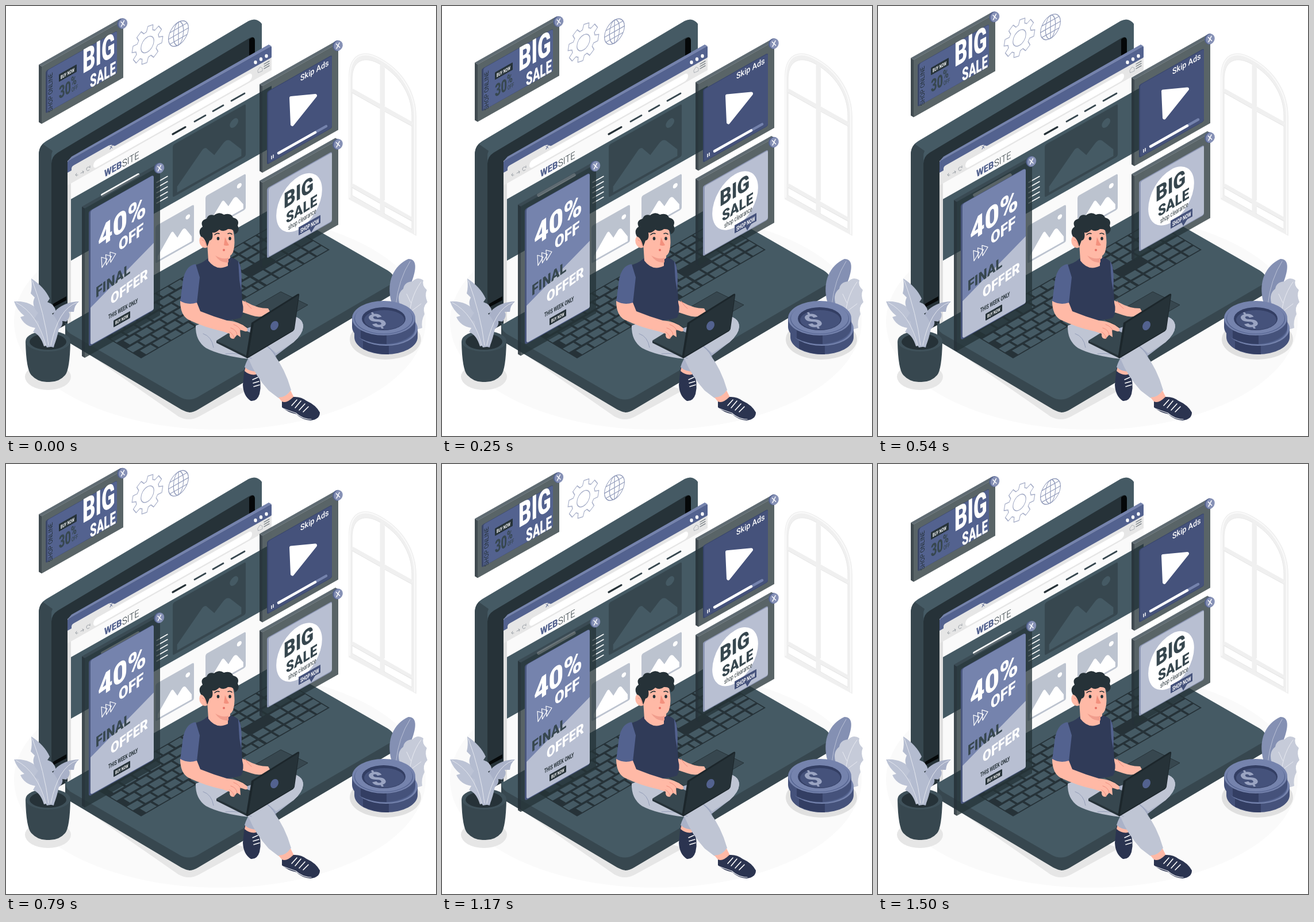
These frames come from a looping animation (748x748 px, 1.54 s). An HTML page with a canvas:

```html
<!DOCTYPE html>
<html lang="en">
<head>
<meta charset="utf-8">
<title>Pop-up ads</title>
<style>
  html, body { margin: 0; width: 100%; height: 100%; overflow: hidden; background: #fff; }
  canvas { position: absolute; left: 0; top: 0; }
</style>
</head>
<body>
<canvas id="back" width="748" height="748"></canvas>
<canvas id="front" width="748" height="748"></canvas>
<script>
const LOOP = 1540, RISE = 14.5;
const SLOPE = 0.565, STEEP = 0.72, ISO = 0.866, CONDENSED = 0.6;
const INK = '#263238', SLATE = '#37474f', STEEL = '#455a64';
const NAVY = '#45527b', DEEP = '#333e63', BLUE = '#53628f', SOFT = '#7583ad', PALE = '#b8bfd2', SKIN = '#ffb9a6';
const back = document.getElementById('back').getContext('2d');
const front = document.getElementById('front').getContext('2d');
let g = back;

function fill(color, d) {
  g.fillStyle = color;
  g.fill(new Path2D(d), 'evenodd');
}
function line(color, width, d) {
  g.strokeStyle = color;
  g.lineWidth = width;
  g.lineCap = g.lineJoin = 'round';
  g.stroke(new Path2D(d));
}
function oval(color, x, y, rx, ry, angle = 0) {
  g.fillStyle = color;
  g.beginPath();
  g.ellipse(x, y, rx, ry, angle, 0, 7);
  g.fill();
}
// Runs draw in a plane that rises to the right; sx is the horizontal scale.
function plane(x, y, draw, sx = 1, slope = SLOPE) {
  g.save();
  g.transform(sx, -slope * sx, 0, 1, x, y);
  draw();
  g.restore();
}
function slab(color, x, y, w, h, r = 0) {
  plane(x, y, () => {
    g.fillStyle = color;
    g.beginPath();
    g.roundRect(0, 0, w, h, r);
    g.fill();
  });
}
function text(str, x, y, size, color, weight = 700, sx = CONDENSED, slope = SLOPE) {
  plane(x, y, () => {
    g.font = `${weight} ${size}px Roboto, sans-serif`;
    g.fillStyle = color;
    g.fillText(str, 0, 0);
  }, sx, slope);
}
function bar(color, width, x, y, length) {
  line(color, width, `M${x},${y}l${length},${-length * SLOPE}`);
}

function archWindow() {
  const outer = 'M596,336V124C596,82 622,73 652,91C690,112 714,150 714,192V400Z';
  const inner = 'M602,329V126C603,92 625,87 650,101C685,121 706,155 706,191V388Z';
  fill('#f0f0f0', outer + inner);
  line('#e8e8e8', 1, inner);
  line('#f0f0f0', 7, 'M654,104V360M604,148L704,204M604,313L704,370');
  line('#e4e4e4', 1, 'M658,108V174M658,184V338M658,349V361M602,151L650,178M658,183L706,209M602,316L650,343M658,348L706,374');
  line('#fafafa', 2, 'M598,333V124C599,82 624,77 652,94C688,114 711,152 711,192V396');
}

function keyboard() {
  const cols = 15, rows = 6, mainCols = 10;
  g.save();
  g.transform(328 / cols, -189 / cols, 85 / rows, 51 / rows, 150, 562);
  g.fillStyle = INK;
  g.fillRect(0, 0, cols, rows);
  g.fillStyle = STEEL;
  for (let row = 0; row < rows; row++) {
    for (let col = 0; col < cols; col++) {
      const main = col < mainCols;
      const space = row === rows - 1 && col > 3 && col < 8;
      const gap = !main && col < 12 && row === 3;
      if (gap || (space && col > 4)) continue;
      const x = col + (main && row % 2 ? 0.4 : 0);
      const w = space ? 3.4 : Math.min(0.84, main ? mainCols - 0.2 - x : 1);
      g.fillRect(x + 0.08, row + 0.12, w, 0.76);
    }
  }
  g.restore();
}

function computer() {
  fill('#e6e6e6', 'M100,575L300,714Q318,724 336,714L420,668L330,640Z');
  // screen housing
  fill(STEEL, 'M57,256Q58,242 70,235L422,26Q436,19 445,31V380L80,565L57,545Z');
  fill(SLATE, 'M57,256Q58,246 64,240L81,252Q79,256 79,262V565L57,545Z');
  fill(INK, 'M79,274Q79,262 90,255L423,56Q433,50 433,62V380L79,568Z');
  fill('#050809', 'M423,58Q433,50 433,62V85L423,90ZM82,518L105,505V512L82,524Z');
  // base
  fill(SLATE, 'M103,550V576Q104,582 112,587L305,702Q318,708 318,706V680Z');
  fill(SLATE, 'M318,680V707Q326,707 334,702L668,504Q676,498 676,478Z');
  fill(STEEL, 'M105,553L465,346L664,460Q684,473 668,485L334,680Q318,689 302,680L112,570Q101,562 105,553Z');
  keyboard();
  fill(SLATE, 'M395,545L478,497L525,520L440,570Z');
  line(INK, 1, 'M395,545L478,497L525,520L440,570Z');
}

function picture(x, y, w, h, box, shape) {
  slab(box, x, y, w, h, 3);
  plane(x, y, () => {
    fill(shape, `M${w * .06},${h * .95}V${h * .84}L${w * .39},${h * .43}Q${w * .44},${h * .36} ${w * .48},${h * .46}
      L${w * .57},${h * .64}L${w * .69},${h * .51}Q${w * .74},${h * .46} ${w * .79},${h * .54}L${w * .94},${h * .82}V${h * .95}Z`);
    oval(shape, w * .84, h * .24, w * .058, w * .058);
  });
}

function website() {
  const x = 107, y = 270, w = 355;
  fill(SOFT, 'M107,270L114,262L457,67L462,70Z');
  slab('#fafafa', x, y, w, 283);
  slab('#e0e0e0', x, y, 6, 283);
  slab(BLUE, x, y, w, 21, 2);
  fill('#e6e6e6', 'M114,290V283Q114,279 118,277L178,243Q184,240 187,243L192,244Z');
  slab('#e6e6e6', x, y + 20, w, 22);
  slab('#fff', 152, y + 1, 276, 13, 6);
  line(BLUE, 1, 'M181,244l4,3m0,-5l-4,7');
  line('#9aa0a6', 1, 'M125,294h-4l2,-3m-2,3l2,2M130,291l5,-3m-2,-1l2,1l-1,3M146,281q-4,-3 -6,2q0,6 5,2m1,-4v-3');
  [434, 443.5, 453].forEach((px, i) => oval('#fff', px, 98 - i * 5.5, 2.7, 3.3));
  line('#aeb3b8', 1, 'M438,112l4,-6l4,2v5l-7,3z');
  [101, 105, 109].forEach(py => bar('#757d82', 1.3, 449, py, 9));

  text('WEB', 171, 298, 17, BLUE, 800, ISO);
  text('SITE', 202, 281, 17, INK, 300, ISO);
  bar(INK, 3.2, 290, 223, 22);
  [[328, 201, 19], [360, 183, 18], [392, 165, 23]].forEach(b => bar(SLATE, 2.8, ...b));

  slab(STEEL, 113, 336, 349, 107);
  picture(290, 242, 127, 91, SLATE, STEEL);
  bar('#fff', 5.5, 168, 329, 62);
  for (let i = 0; i < 5; i++) bar('#fff', 1.5, 262, 307 + i * 9, 19);
  picture(260, 383, 67, 65, '#bcc3cf', '#fff');
  picture(347, 331, 70, 62, '#bcc3cf', '#fff');
}

function pottedPlant() {
  oval('#e6e6e6', 73, 645, 40, 23);
  fill(SLATE, 'M34,584Q35,632 44,642Q56,655 73,654Q92,655 103,642Q111,632 112,584Z');
  oval('#3f515a', 73, 583, 39, 18);
  oval(INK, 73, 584, 32, 14);
  fill('#a9b1c8', 'M67,590Q70,548 88,528Q105,514 127,514Q119,520 118,532L109,532Q114,539 105,549L98,548Q100,556 91,563Q86,578 83,594Z');
  fill('#bcc3d5', 'M66,592Q60,572 47,567L51,560Q32,557 25,541L32,539Q19,529 14,514Q42,512 59,532Q75,552 74,590Z');
  fill('#b4bcd0', 'M71,594Q58,568 57,549L49,544L56,534Q43,520 50,507L43,500Q46,489 44,474Q67,489 76,509L72,515Q85,519 87,532L80,535Q91,546 92,561Q89,578 83,592Z');
  line('#e3e6ee', 1, 'M46,478Q67,535 74,590M18,516Q55,535 69,590M123,516Q91,527 78,590');
}

function coin(x, y) {
  const rx = 55, ry = 30, depth = 15;
  fill(NAVY, `M${x - rx},${y}v${depth}A${rx},${ry} 0 0 0 ${x + rx},${y + depth}v${-depth}Z`);
  fill(DEEP, `M${x - 40},${y + 18}v${depth + 2}Q${x - 20},${y + ry + depth} ${x + 5},${y + ry + depth}v${-depth}Z`);
  oval(SOFT, x, y, rx, ry);
  oval(BLUE, x, y + 1, rx - 4, ry - 3);
}
function coins() {
  fill('#8490b3', 'M671,517C660,480 675,451 700,440C718,440 712,464 705,482Q698,503 688,522Z');
  line('#b9c0d5', 1, 'M703,444Q683,475 678,520');
  fill('#c6cbd9', 'M686,522Q678,502 691,492Q693,480 707,479Q716,470 726,477Q723,486 732,494Q728,503 733,515Q724,524 728,536Q722,547 724,560L704,566Z');
  line('#e8eaf1', 1, 'M722,480Q700,510 701,555M704,516l-7,-15M702,533l20,-15');
  oval('#e0e0e0', 660, 580, 62, 35);
  coin(661, 561);
  coin(657, 543);
  oval(SOFT, 657, 543, 50, 27);
  oval(DEEP, 657, 544, 38, 20);
  oval(NAVY, 658, 546, 35, 17);
  g.save();
  g.transform(1.05, -.25, .5, .72, 640, 561);
  g.font = '800 42px Roboto, sans-serif';
  g.fillStyle = '#9aa4c2';
  g.fillText('$', 0, 0);
  g.restore();
}

function legs() {
  fill('#2b3450', 'M415,629Q425,640 437,636Q446,655 441,675Q437,688 426,687Q413,679 412,659Z');
  line('#fff', 1.5, 'M429,650l9,-4M430,656l10,-3M431,662l10,-3');
  fill(SKIN, 'M418,622L440,631L435,641Q424,643 415,635Z');
  fill('#aab2c8', 'M405,565L490,538Q517,540 517,558Q516,571 500,585L454,620L440,636Q424,637 415,628Q422,604 445,590Z');
  fill('#bfc5d4', 'M330,556Q329,582 348,595Q372,608 422,614Q434,644 457,669L474,682Q488,681 496,668Q486,632 464,603Q447,580 412,573L350,548Z');
  fill('#bfc5d4', 'M490,538Q517,540 517,558Q516,571 500,585L470,604L450,586Z');
  line('#939db8', 1, 'M343,570Q358,575 361,594M454,592Q468,602 470,612M382,605Q407,602 427,613');
  fill(SKIN, 'M474,681Q487,681 495,669L503,685L484,693Z');
  fill('#2b3450', 'M480,688Q488,692 500,680Q513,679 523,687Q539,694 546,707Q546,719 530,721Q515,720 505,710Q490,707 480,698Z');
  line('#fff', 1.6, 'M497,695l9,-10M503,699l10,-12M510,703l10,-11M517,706l9,-9');
  line('#e9ebf0', 1.2, 'M482,700Q492,704 504,708Q516,719 531,719');
}

function head() {
  fill(SKIN, 'M350,412H390V438Q388,441 386,440V452Q366,462 352,443Z');
  fill('#f19d8d', 'M364,434Q377,442 387,438V446Q373,448 364,434Z');
  fill(SKIN, 'M351,390Q375,378 395,390Q400,412 395,428Q390,439 378,437Q361,434 354,420Z');
  oval(SKIN, 345, 410, 8.5, 11, -.3);
  line('#f08f80', 1, 'M341,407Q347,408 348,416');
  fill(INK, `M350,419Q346,402 339,401Q333,390 342,384Q337,373 349,370Q352,361 362,364
    Q371,357 379,363Q391,359 395,368Q407,371 403,382Q408,392 398,397Q397,387 386,388
    Q379,394 371,389Q364,396 359,394Q361,407 354,408Z`);
  oval(INK, 369, 404.5, 2.3, 3);
  oval(INK, 389.5, 404.5, 2.3, 3);
  line(INK, 1.6, 'M363,398Q367,394 371,396M386,396Q390,394 393,397');
  fill('#f3907d', 'M381,402Q384,410 388,416Q384,418 379,416Z');
  oval('#e56f64', 379, 424.5, 2, 2);
}

function man() {
  legs();
  fill(SKIN, 'M405,510L420,516Q437,526 456,526L461,535Q443,544 427,538L403,530Z');
  line('#f08f80', 1, 'M416,513Q422,523 427,526');
  fill('#303b58', 'M326,451Q340,449 351,439Q370,458 388,437Q404,439 408,452L411,516Q415,529 409,542Q370,555 331,537Z');
  fill(BLUE, 'M330,449Q313,451 308,476L303,515Q316,521 332,517L337,472Z');
  fill(BLUE, 'M404,444Q412,456 409,495L406,477Z');
  head();
  // small laptop
  fill(SLATE, 'M366,582L403,559L463,584L420,612Z');
  fill(INK, 'M366,582L420,609V613L366,586Z');
  fill('#1c262b', 'M427,551L507,501Q511,499 510,504L502,561Q501,565 497,567L420,613Q417,612 418,607Z');
  fill(INK, 'M431,552L509,503L501,563L421,610Z');
  oval(BLUE, 467, 556, 6.5, 8.5, .5);
  fill(SKIN, `M303,513Q316,521 332,516L338,531Q360,540 384,547Q407,549 419,560Q422,567 416,566
    L407,563L408,576L402,572L396,579Q388,579 389,570L377,566Q345,559 318,546Q303,538 303,513Z`);
  line('#f08f80', 1, 'M396,554Q405,557 408,564M391,560Q401,563 402,572M389,567Q395,570 397,578');
}

function gear(cx, cy) {
  plane(cx, cy, () => {
    const teeth = 8, step = Math.PI * 2 / teeth;
    const at = (r, a) => `${r * Math.cos(a)},${r * Math.sin(a)}`;
    let d = '';
    for (let i = 0; i < teeth; i++) {
      const a = i * step + .2;
      d += `${i ? 'L' : 'M'}${at(23, a - .28)}L${at(31, a - .17)}L${at(31, a + .17)}L${at(23, a + .28)}A23,23 0 0 1 ${at(23, a + step - .28)}`;
    }
    line('#a5adc7', 1.4, d + 'ZM13,0A13,13 0 1 1 -13,0A13,13 0 1 1 13,0');
  }, ISO);
}
function globe(cx, cy) {
  plane(cx, cy, () => {
    g.strokeStyle = '#8f99b9';
    g.lineWidth = 1.3;
    [20, 10].forEach(rx => {
      g.beginPath();
      g.ellipse(0, 0, rx, 20, 0, 0, 7);
      g.stroke();
    });
    line('#8f99b9', 1.3, 'M0,-20V20M-20,0H20M-17,-10H17M-17,10H17');
  }, ISO);
}

function panel(x, y, w, h) {
  const rise = w * SLOPE;
  fill('rgba(38,50,56,.88)', `M${x - 5},${y - 3}l5,3v${h}l-5,-3z`);
  fill('rgba(55,71,79,.8)', `M${x - 5},${y - 3}l5,3l${w},${-rise}l-5,-3z`);
  slab('rgba(38,52,56,.76)', x, y, w, h);
}
function closeButton(x, y) {
  oval(BLUE, x - 1, y, 8.3, 9.5, .4);
  oval('#8691b6', x + .5, y, 7.5, 9, .4);
  line('#fff', 1.5, `M${x - 3},${y - 3}l6,6m-.5,-8l-5,10`);
}
function label(str, x, y, w, h, size) {
  slab(INK, x, y, w, h, 1);
  text(str, x + 3, y + h * .76 - 1.5, size, '#fff', 700);
}

function saleBanner() {
  panel(62, 105, 142, 100);
  slab('#3b4769', 69, 113, 124, 74, 3);
  slab(BLUE, 72, 112, 121, 73, 3);
  plane(81, 182, () => {
    g.rotate(-Math.PI / 2);
    g.font = '400 10.5px Roboto, sans-serif';
    g.fillStyle = INK;
    g.fillText('SHOP ONLINE', 0, 0);
  });
  label('BUY NOW', 92, 119, 31, 13, 9);
  text('30', 92, 162, 30, SLATE, 900);
  text('%', 113, 140, 22, SLATE, 900);
  text('OFF', 114, 150, 10.5, SLATE, 500);
  text('BIG', 133, 118, 58, '#fff', 900);
  text('SALE', 146, 143, 31, '#fff', 900);
  closeButton(203, 30.5);
}

function videoAd() {
  panel(446, 139, 132, 151);
  slab('#38456b', 454, 149, 113, 127, 3);
  slab(NAVY, 456, 149, 111, 125, 3);
  text('Skip Ads', 512, 131, 14.5, '#fff', 500, ISO);
  const play = 'M496,160L538,156L498,206Z';
  fill('#fff', play);
  line('#fff', 6, play);
  line('#fff', 1.5, 'M462,261v5M465,259v5');
  bar(SOFT, 4.5, 474, 256, 83);
  bar('#fff', 4.5, 474, 256, 64);
  closeButton(577.5, 69);
}

function clearanceAd() {
  panel(446, 307, 132, 148);
  slab('#8d97b5', 454, 317, 113, 122, 3);
  slab(PALE, 457, 317, 110, 119, 3);
  plane(510, 342, () => oval('#fff', 0, 0, 46, 46), ISO);
  text('BIG', 483, 353, 37, SLATE, 900, ISO, 0.62);
  text('SALE', 487, 379, 26, SLATE, 900, ISO, 0.62);
  text('shop clearance', 491, 390, 12, INK, 400, CONDENSED, 0.62);
  fill(NAVY, 'M528,388L540,379L531,394Z');
  slab(NAVY, 509, 385, 38, 14);
  text('SHOP NOW', 512, 395, 10.5, '#fff', 700);
  closeButton(577.5, 240.5);
}

function offerAd() {
  panel(137, 352, 131, 260);
  slab('#49567d', 144, 357, 113, 236, 4);
  slab(SOFT, 147, 356, 110, 234, 4);
  fill(PALE, 'M147,525L257,412V525Q257,528 254,529.5L150,588Q147,589 147,586Z');
  text('40%', 160, 423, 51, '#fff', 900, ISO, STEEP);
  text('OFF', 196, 427, 28, '#fff', 900, ISO, STEEP);
  for (let i = 0; i < 3; i++) line('#fff', 1.2, `M${166 + i * 7.5},${437 - i * 4.5}l10,3l-9,15z`);
  text('FINAL', 156, 508, 25, SLATE, 900, ISO, STEEP);
  text('OFFER', 182, 520, 25, '#fff', 900, ISO, STEEP);
  text('THIS WEEK ONLY', 178, 545, 11, INK, 700);
  label('BUY NOW', 187, 547, 29, 12, 8.5);
  closeButton(267, 282);
}

function drawScene() {
  oval('#fafafa', 372, 549, 358, 188);
  archWindow();
  computer();
  website();
  pottedPlant();
  coins();
  man();
}

function frame(now) {
  const phase = now % LOOP / LOOP;
  const lift = RISE * (1 - Math.cos(phase * Math.PI * 2)) / 2;
  g.clearRect(0, 0, 748, 748);
  g.save();
  g.translate(0, -lift);
  gear(246, 67);
  globe(300, 48);
  saleBanner();
  videoAd();
  clearanceAd();
  offerAd();
  g.restore();
  requestAnimationFrame(frame);
}

drawScene();
g = front;
frame(0);
</script>
</body>
</html>
```
